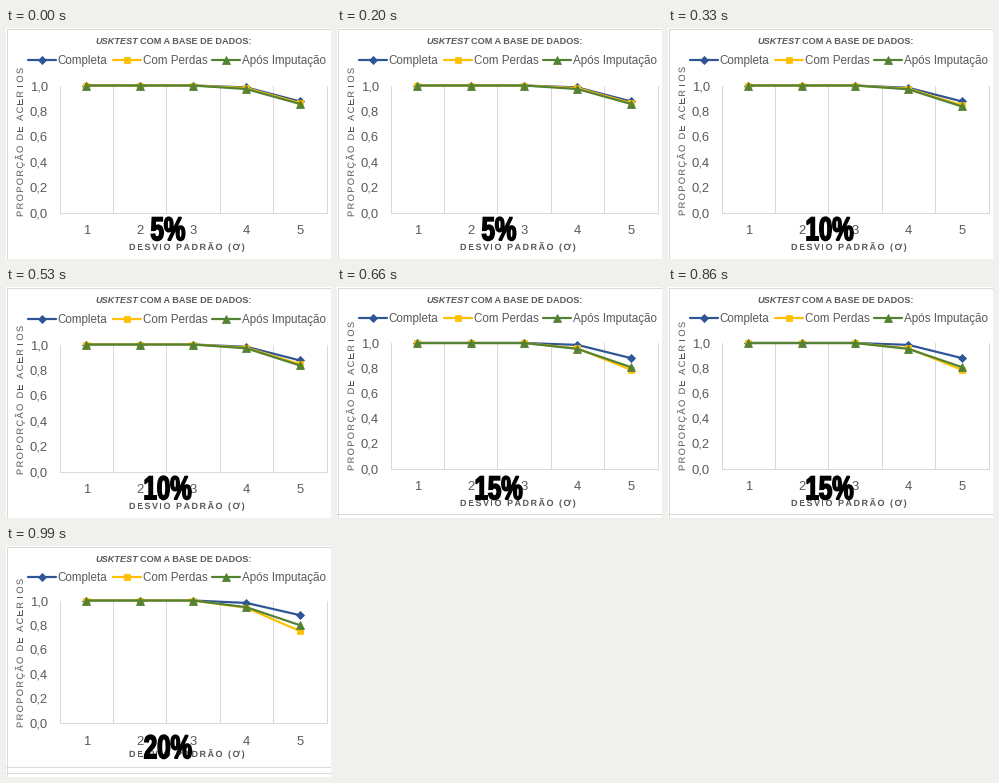
These frames come from a looping animation (325x231 px, 1320 ms). A matplotlib script:

```python
import matplotlib.pyplot as plt
from matplotlib.animation import FuncAnimation
from matplotlib.patches import PathPatch
from matplotlib.textpath import TextPath
from matplotlib.transforms import Affine2D

W, H, DPI = 325, 231, 100
PT = 72 / DPI  # points per pixel
INK, RULE = "#595959", "#d9d9d9"
FONT = "Liberation Sans"

plt.rcParams["font.family"] = FONT
fig = plt.figure(figsize=(W / DPI, H / DPI), dpi=DPI, facecolor="white")
ax = fig.add_axes([0, 0, 1, 1])

LEFT, RIGHT = 53.5, 320.5
STEP = (RIGHT - LEFT) / 5
XS = [LEFT + STEP * (k + 0.5) for k in range(5)]

# name, colour, marker, marker size, legend line start, label start
SERIES = [
    ("Completa", "#2f5597", "D", 5.2, 22, 51),
    ("Com Perdas", "#ffc000", "s", 6.8, 107, 137),
    ("Após Imputação", "#548235", "^", 7.6, 206, 236),
]

# Values at deviations 4 and 5 per series, then the layout of each chart
CHARTS = [
    dict(label="5%", ends=[(.985, .875), (.980, .862), (.972, .855)],
         top=57.5, base=184.5, legend=32, head=13, ticks=201.5,
         xtitle=219, ytitle=189, rules=[]),
    dict(label="10%", ends=[(.982, .875), (.975, .845), (.970, .835)],
         top=57.5, base=184.5, legend=32, head=13, ticks=201.5,
         xtitle=219, ytitle=188, rules=[]),
    dict(label="15%", ends=[(.985, .880), (.957, .787), (.953, .808)],
         top=56, base=181.5, legend=31, head=12.5, ticks=198.5,
         xtitle=216, ytitle=184, rules=[226.5]),
    dict(label="20%", ends=[(.980, .880), (.940, .750), (.945, .798)],
         top=54.5, base=176.5, legend=30.5, head=13, ticks=194,
         xtitle=208, ytitle=182, rules=[220.5, 226.5]),
]


def line(xs, ys, color=RULE, width=1, **kw):
    ax.plot(xs, ys, color=color, lw=width * PT, **kw)


def text(x, mid, s, px, **kw):
    """Text whose capitals are centred on the height mid."""
    kw.setdefault("color", INK)
    ax.text(x, mid + 0.35 * px, s, fontsize=px * PT, va="baseline", **kw)


def outline(s, px, weight, x=0):
    return TextPath((x, 0), s, size=px, prop=dict(family=FONT, weight=weight))


def advance(c, px, weight):
    right = lambda s: outline(s, px, weight).get_extents().x1
    return right(c + "I") - right("I")


def spaced(x, y, s, px, gap, weight="normal", angle=0):
    """Letter-spaced text starting at the baseline point (x, y)."""
    place = Affine2D().scale(1, -1).rotate_deg(-angle).translate(x, y)
    pen = 0
    for c in s:
        if c != " ":
            glyph = outline(c, px, weight, pen)
            ax.add_patch(PathPatch(place.transform_path(glyph), fc=INK, lw=0))
        pen += advance(c, px, weight) + gap


def poster(cx, base, s, px=33, narrow=0.73):
    """Heavy condensed lettering centred on cx."""
    path = outline(s, px, "bold")
    box = path.get_extents()
    place = (Affine2D().translate(-(box.x0 + box.x1) / 2, 0)
             .scale(narrow, -1).translate(cx, base))
    ax.add_patch(PathPatch(place.transform_path(path), fc="black", ec="black",
                           lw=1.6 * PT, joinstyle="miter", zorder=9))


def draw(i):
    chart = CHARTS[i % len(CHARTS)]
    top, base = chart["top"], chart["base"]
    ax.clear()
    ax.set(xlim=(0, W), ylim=(H, 0))
    ax.axis("off")

    # borders and grid
    line([.5, W - .5, W - .5, .5, .5], [.5, .5, H - .5, H - .5, .5])
    for y in chart["rules"]:
        line([0, W], [y, y])
    for k in range(6):
        x = LEFT + k * STEP
        line([x, x], [top, base])
    line([LEFT, RIGHT], [base, base])

    # titles and scales
    text(89, chart["head"], "USKTEST", 9.1, weight="bold", style="italic")
    text(134, chart["head"], "COM A BASE DE DADOS:", 9.1, weight="bold")
    for k in range(6):
        label = f"{k / 5:.1f}".replace(".", ",")
        text(42, base + (top - base) * k / 5, label, 13, ha="right")
    for k, x in enumerate(XS):
        text(x, chart["ticks"], str(k + 1), 13, ha="center")
    spaced(123, chart["xtitle"] + 3, "DESVIO PADRÃO (Ơ)", 9, 1.5, "bold")
    spaced(17, chart["ytitle"], "PROPORÇÃO DE ACERTOS", 9.3, 1.35, angle=90)

    # series and legend
    for (name, color, mark, size, x0, tx), ends in zip(SERIES, chart["ends"]):
        style = dict(color=color, width=2.2, marker=mark, ms=size * PT,
                     mew=0.8 * PT, solid_capstyle="round", zorder=4)
        line(XS, [base + (top - base) * v for v in (1, 1, 1, *ends)], **style)
        y = chart["legend"]
        line([x0, x0 + 14, x0 + 28], [y] * 3, markevery=[1], **style)
        text(tx, y, name, 11.6)

    poster(162, 212.2, chart["label"])
    return []


anim = FuncAnimation(fig, draw, frames=len(CHARTS), init_func=lambda: [],
                     interval=330, repeat=True, repeat_delay=0, blit=False)
plt.show()
```
